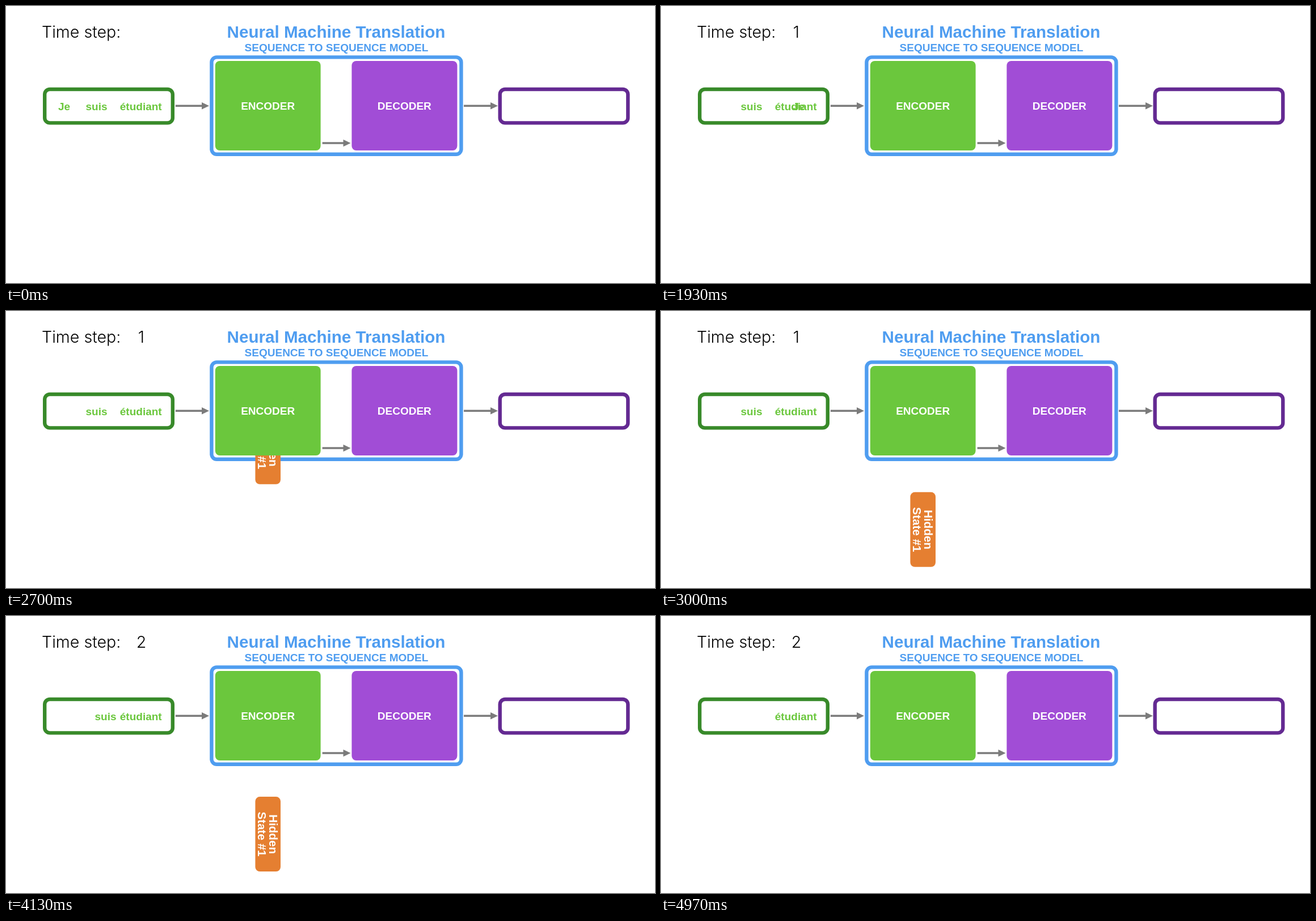
An HTML page that plays this animation: 1144 by 489 pixels, repeating every 5.01 s.

```html
<!DOCTYPE html>
<html lang="en">
<head>
<meta charset="utf-8">
<title>Sequence to sequence model</title>
<style>
  html, body { margin: 0; width: 100%; height: 100%; overflow: hidden; background: #fff; }
  svg { display: block; width: 100%; height: 100%; }
  text { font-family: "Liberation Sans", Arial, sans-serif; font-weight: 700; font-size: 19px; }
  .light { font-family: Inter, Roboto, sans-serif; font-weight: 300; font-size: 28.6px; fill: #000; }
  .mid { text-anchor: middle; }
  .word { fill: #6bc73d; }
  .blue { fill: #4f9df0; }
  .white { fill: #fff; }
  .frame { fill: none; stroke-width: 6.4; }
  .arrow path { fill: #7b7b7b; }
  .state text { font-size: 20.6px; }
</style>
</head>
<body>
<svg viewBox="0 0 1144 489">
  <defs>
    <path id="head" d="M-13-6.3L0 0L-13 6.3Z"/>
  </defs>

  <text class="light" x="63" y="56">Time step:</text>
  <text class="light mid" id="one" x="238.5" y="56">1</text>
  <text class="light mid" id="two" x="238.5" y="56">2</text>

  <text class="blue mid" x="582" y="55.5" style="font-size:29.6px">Neural Machine Translation</text>
  <text class="blue mid" x="582.5" y="80">SEQUENCE TO SEQUENCE MODEL</text>

  <text class="word" id="je" x="92" y="183.5">Je</text>
  <text class="word" id="suis" x="140.5" y="183.5">suis</text>
  <text class="word" x="200.8" y="183.5">étudiant</text>

  <rect class="frame" x="68.2" y="147" width="225.6" height="59.4" rx="9" stroke="#388a2a"/>
  <rect class="frame" x="870.7" y="147" width="225.6" height="59.4" rx="9" stroke="#642a92"/>
  <rect class="frame" x="362.4" y="90.4" width="440" height="171.4" rx="9" stroke="#4f9df0"/>

  <g class="arrow" id="arrows"></g>

  <g class="state" id="state">
    <rect x="439.4" y="0" width="44.6" height="132" rx="8" fill="#e57f31"/>
    <text class="white mid" transform="translate(464 66) rotate(90)">Hidden</text>
    <text class="white mid" transform="translate(444 66) rotate(90)">State #1</text>
  </g>

  <rect x="368.8" y="97" width="185.8" height="158" rx="8" fill="#6bc73d"/>
  <rect x="609.4" y="97" width="186" height="158" rx="8" fill="#a14dd6"/>
  <text class="white mid" x="461.7" y="182.7">ENCODER</text>
  <text class="white mid" x="702.3" y="182.7">DECODER</text>
</svg>
<script>
  const LOOP = 5010;
  const get = id => document.getElementById(id);
  const one = get("one"), two = get("two"), je = get("je"), suis = get("suis"), state = get("state");

  const progress = (t, start, length) => Math.min(1, Math.max(0, (t - start) / length));
  const smooth = p => p * p * (3 - 2 * p);
  const glide = p => p < 0.5
    ? 0.5 * Math.pow(2 * p, 3.7)
    : 1 - 0.5 * Math.pow(2 - 2 * p, 3.7);

  const arrow = (x1, x2, y) =>
    `<path d="M${x1} ${y - 1.7}H${x2 - 11}v3.4H${x1}z"/>` +
    `<use href="#head" x="${x2}" y="${y}" fill="#7b7b7b"/>`;
  get("arrows").innerHTML =
    arrow(298.8, 358, 176.3) + arrow(557.6, 607.5, 242) + arrow(807, 867, 176.3);

  const show = (el, on) => el.setAttribute("visibility", on ? "visible" : "hidden");
  const shift = (el, x, y) => el.setAttribute("transform", `translate(${x} ${y})`);

  // A digit shrinks onto its place while it fades in.
  function drop(el, t, first, last) {
    show(el, t >= first && t < last);
    const p = progress(t, first - 20, 515);
    const s = 9 - 8 * Math.pow(p, 1.4);
    el.setAttribute("opacity", 0.02 + 0.98 * Math.pow(p, 3.5));
    el.setAttribute("transform", `translate(238.5 46) scale(${s}) translate(-238.5 -46)`);
  }

  function draw(t) {
    drop(one, t, 1170, 3370);
    drop(two, t, 3370, LOOP);

    const jeP = progress(t, 1685, 575);
    shift(je, 358 * smooth(jeP), 0);
    show(je, jeP < 1);

    const back = glide(progress(t, 3857, 1000));
    shift(suis, 296 * back, 0);
    show(suis, back < 1);

    const out = glide(progress(t, 2270, 1000));
    shift(state, 0, 110 + 221 * (out - back));
    show(state, out > 0 && back < 1);
  }

  const begin = performance.now();
  function tick() {
    draw((performance.now() - begin) % LOOP);
    requestAnimationFrame(tick);
  }
  draw(0);
  requestAnimationFrame(tick);
</script>
</body>
</html>
```
